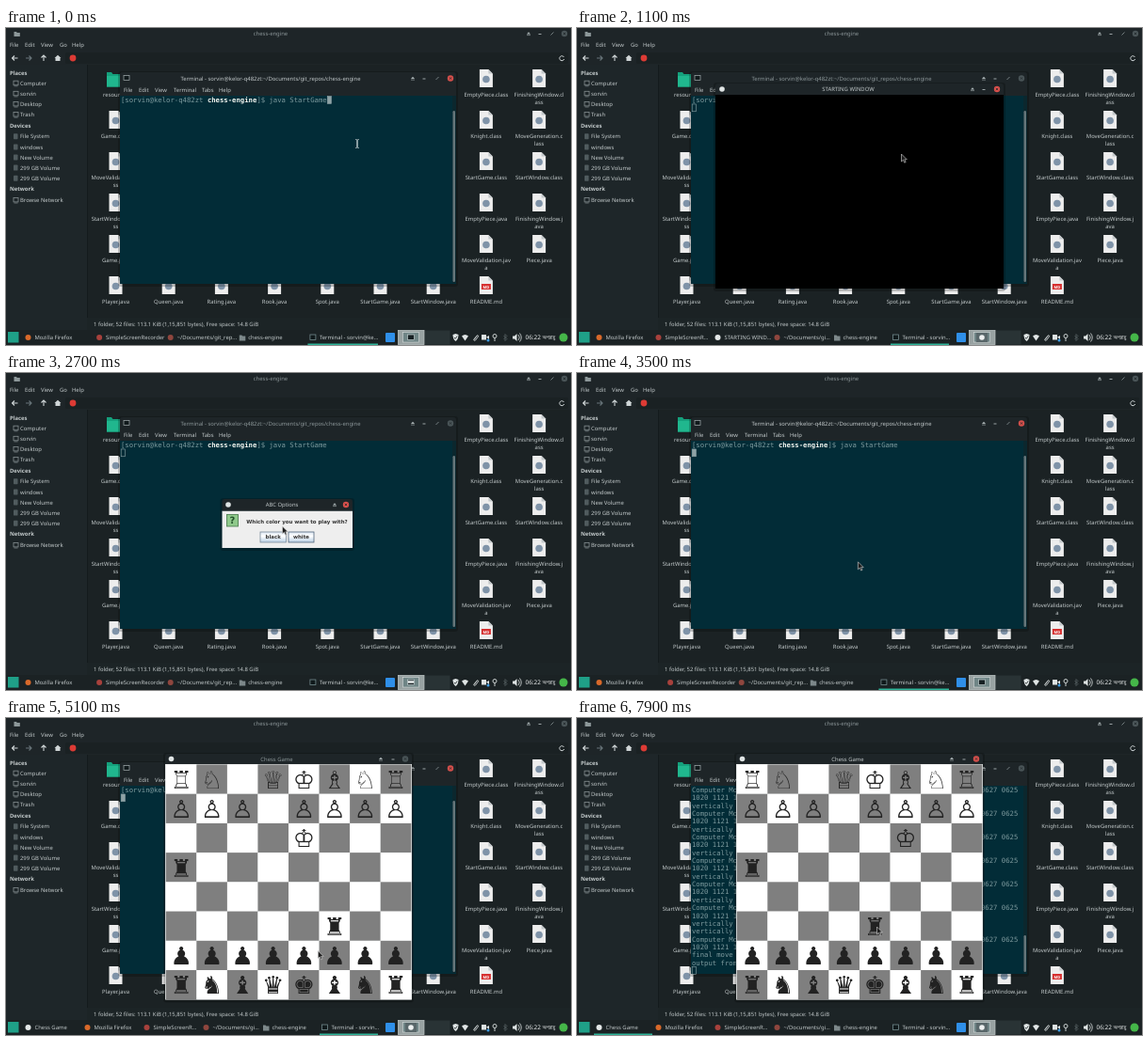
Animation, 600 px wide and 337 px high, one loop 8 s. Source, as an HTML page:

```html
<!DOCTYPE html>
<html lang="en">
<head>
<meta charset="utf-8">
<title>Chess engine demo</title>
<style>
html, body { margin: 0; width: 100%; height: 100%; overflow: hidden; background: #1b2224; }
svg { display: block; width: 100vw; height: 100vh; }
text { font-family: "Noto Sans", "Open Sans", sans-serif; font-size: 5.9px; fill: #c3cacb; white-space: pre; text-rendering: geometricPrecision; }
.b { font-weight: 700; }
.mid { text-anchor: middle; }
.dim { fill: #8d989a; }
.mono { font-family: "DejaVu Sans Mono", monospace; font-size: 7.28px; fill: #7f9a9e; }
.java { font-family: "DejaVu Sans", sans-serif; font-weight: 700; text-anchor: middle; }
.piece { font-family: "DejaVu Sans", sans-serif; font-size: 26px; fill: #222; text-anchor: middle; }
</style>
</head>
<body>
<svg id="stage" viewBox="0 0 600 337" preserveAspectRatio="none"></svg>
<script>
const LOOP = 8000;
const USER = 'sorvin', HOST = 'kelor-q482zt';
const TEAL = '#2eb398', RED = '#d8504c', HEADER = '#1e2528', GREY = '#4a5558';
const CHAR = 4.385;
const lineY = i => 78.9 + i * 8.35;

const rect = (x, y, w, h, fill, more = '') =>
  `<rect x="${x}" y="${y}" width="${w}" height="${h}" fill="${fill}" ${more}/>`;
const dot = (x, y, r, fill, more = '') => `<circle cx="${x}" cy="${y}" r="${r}" fill="${fill}" ${more}/>`;
const line = (d, color = '#aab3b5', width = 0.9) =>
  `<path d="${d}" fill="none" stroke="${color}" stroke-width="${width}"/>`;
const shape = (d, fill, more = '') => `<path d="${d}" fill="${fill}" ${more}/>`;
// y is the visual middle of the line
const label = (x, y, s, cls = '', more = '') =>
  `<text x="${x}" y="${y + 2.1}" class="${cls}" ${more}>${s}</text>`;
const group = (id, body) => `<g id="${id}">${body}</g>`;

const closeButton = (x, y, color, id = '') => dot(x, y, 3.2, color, id && `id="${id}"`) +
  line(`M${x - 1.2} ${y - 1.2}l2.4 2.4m0-2.4l-2.4 2.4`, '#20282a', 0.7);
const upButton = (x, y) => shape(`M${x - 2} ${y + 0.6}l2-2.4 2 2.4z`, '#aab3b5') + line(`M${x - 2} ${y + 1.6}h4`, '#aab3b5', 0.6);
const dashButton = (x, y) => line(`M${x - 1.5} ${y + 0.5}h3`);
const growButton = (x, y) => line(`M${x - 1.5} ${y + 1.5}l3-3`, '#8d989a', 0.8);
const appIcon = (x, y) => dot(x, y, 2.8, '#dfe4e4');

function frame(x, y, w, h, bar, body) {
  return rect(x - 2, y - 1, w + 4, h + 4, '#000', 'opacity=".22" rx="3"') + rect(x, y + bar, w, h - bar, body) +
    shape(`M${x} ${y + bar}v${3 - bar}q0-3 3-3h${w - 6}q3 0 3 3v${bar - 3}z`, HEADER);
}

const page = (x, y) => shape(`M${x - 7} ${y - 10}h9.5l4.5 4.5v14.5h-14z`, '#ededed') +
  shape(`M${x + 2.5} ${y - 10}v4.5h4.5z`, '#c3c8ca');

function fileManager() {
  const col = i => 116.5 + i * 56.2;
  const row = i => 54 + i * 44;
  const files = [
    [0, 1, 'Game.class'], [0, 2, 'MoveValidation.cla', 'ss'], [0, 3, 'StartWindow$1.cla', 'ss'],
    [0, 4, 'Game.java'], [0, 5, 'Player.java'], [1, 5, 'Queen.java'], [2, 5, 'Rating.java'],
    [3, 5, 'Rook.java'], [4, 5, 'Spot.java'], [5, 5, 'StartGame.java'], [6, 5, 'StartWindow.java'],
    [7, 0, 'EmptyPiece.class'], [7, 1, 'Knight.class'], [7, 2, 'StartGame.class'],
    [7, 3, 'EmptyPiece.java'], [7, 4, 'MoveValidation.jav', 'a'], [7, 5, 'README.md'],
    [8, 0, 'FinishingWindow.cl', 'ass'], [8, 1, 'MoveGeneration.c', 'lass'],
    [8, 2, 'StartWindow.class'], [8, 3, 'FinishingWindow.j', 'ava'], [8, 4, 'Piece.java']
  ];
  let s = rect(0, 0, 600, 337, '#1b2224') + rect(0, 0, 600, 39, HEADER) + rect(0, 39, 86, 282, '#1e2629') +
    rect(86, 39, 0.6, 282, '#12181a') + rect(63, 26, 534, 12, '#1a2123', 'rx="1.5"') + rect(86, 308, 514, 13, '#1c2426');
  s += shape('M8.5 4h2.500l.8 1h3v4h-6.300z', '#8d989a') + label(281, 6, 'chess-engine', 'mid dim') +
    upButton(555, 6) + dashButton(567, 6) + growButton(580, 6) + closeButton(593, 6, GREY);
  [[4, 'File'], [20, 'Edit'], [37, 'View'], [57, 'Go'], [70, 'Help']].forEach(([x, t]) => s += label(x, 18, t));
  s += line('M12.5 32h-6m2.5-2.5l-2.500 2.500 2.500 2.500', '#d0d6d7', 1.1) + line('M21 32h6m-2.5-2.5l2.5 2.5-2.5 2.5', '#69757a', 1.1) +
    line('M40 35v-6m-2.5 2.5l2.5-2.5 2.5 2.5', '#d0d6d7', 1.1) + shape('M51.5 32l3.5-3.2 3.5 3.2h-1v3h-5v-3z', '#d0d6d7') +
    dot(71, 32, 3.4, '#dd3b35') + line('M592.5 31a2.500 2.500 0 1 0 .2 2', '#d0d6d7', 1);

  [[47.5, 'Places'], [103.5, 'Devices'], [171, 'Network']].forEach(([y, t]) => s += label(4, y, t, 'b'));
  const places = ['Computer', USER, 'Desktop', 'Trash'];
  const drives = ['File System', 'windows', 'New Volume', '299 GB Volume', '299 GB Volume'];
  const place = (t, y) => rect(8, y - 2.6, 5, 4.5, 'none', 'stroke="#858f91" stroke-width=".8"') +
    line(`M8.5 ${y + 3}h4`, '#858f91', 0.7) + label(15, y, t);
  places.forEach((t, i) => s += place(t, 58.8 + i * 11.1));
  drives.forEach((t, i) => s += rect(8, 112.3 + i * 11.1, 4.5, 6, '#505b5e', 'rx=".7"') + label(15, 115.3 + i * 11.1, t));
  s += place('Browse Network', 183);

  s += shape('M107 47h5l1.5 2h8v13.5h-14.5z', '#15a07c') + rect(107, 51, 14.5, 11.5, '#20b78e') + label(col(0), 70.8, 'resources', 'mid');
  files.forEach(([c, r, first, rest]) => {
    const x = col(c), y = row(r);
    s += page(x, y);
    s += first === 'README.md'
      ? rect(x - 5, y - 2, 10, 6, '#d62f2f') + label(x, y + 0.5, 'MD', 'mid b', 'style="font-size:4px;fill:#fff"')
      : dot(x, y + 0.5, 3.8, '#7f93a8');
    s += label(x, y + 16.6, first, 'mid');
    if (rest) s += label(x, y + 24.6, rest, 'mid');
  });
  return s + label(93, 315, '1 folder, 52 files: 113.1 KiB (1,15,851 bytes), Free space: 14.8 GiB');
}

function terminal() {
  const mono = (i, str, x = 122) => `<text class="mono" x="${x}" y="${lineY(i)}">${str}</text>`;
  const prompt = mono(0, `[${USER}@${HOST} <tspan font-weight="700" fill="#f1f3ee">chess-engine</tspan>]$ java StartGame`);
  const kinds = ['Computer Moves', '1020 1121 1222 1323 1424 1525', 'vertically moving'];
  let log = '';
  for (let i = 0; i < 21; i++) {
    const kind = i < 18 ? i % 3 : (i - 16) % 3;
    log += mono(i, kinds[kind]);
    if (kind === 0) log += mono(i, '0627 0625', 122 + 70 * CHAR);
  }
  log += mono(21, 'final move 0422 0522') + mono(22, 'output from engine');
  const menu = [[125, 'File'], [141, 'Edit'], [158, 'View'], [178, 'Terminal'], [208, 'Tabs'], [226, 'Help']]
    .map(([x, t]) => label(x, 66, t)).join('');
  return frame(121, 47, 357, 225, 25, '#022c37') + rect(125, 50.5, 6, 5, '#10191b', 'stroke="#a5afb1" stroke-width=".7"') +
    label(281, 53.5, `Terminal - ${USER}@${HOST}:~/Documents/git_repos/chess-engine`, 'mid', 'id="termTitle"') +
    upButton(432, 53.5) + dashButton(444, 53.5) + growButton(458, 53.5) + closeButton(472, 53.5, RED, 'termClose') + menu +
    rect(474, 72, 4, 199, '#0b272e') + rect(474.5, 88, 2.5, 182, '#65767a', 'rx="1.2" id="scroll"') +
    group('prompt', prompt) + group('log', log) +
    '<rect id="caret" width="4.2" height="7.8" stroke="#8fa3a6" stroke-width=".6"/>';
}

function startWindow() {
  const big = (y, s, size, fill) => `<text class="java" x="300" y="${y}" style="font-size:${size}px;fill:${fill}">${s}</text>`;
  return frame(147, 59, 306, 218, 12, '#000') + appIcon(154, 65) + label(288, 65, 'STARTING WINDOW', 'mid') +
    upButton(420, 65) + dashButton(432, 65) + closeButton(446, 65, RED) +
    group('menuBody', big(110, 'AUTONOMUS CHESS ENGINE', 17.5, '#ffff21') +
      rect(237, 136.5, 126, 22, '#fb0b0b', 'stroke="#b9d5e6" stroke-width="1.2"') + big(153.1, 'START GAME', 15.3, '#240808') +
      rect(273.5, 181, 53, 22.5, '#0505ff', 'stroke="#8799b0" stroke-width=".8"') + big(197.8, 'EXIT', 15.3, '#08081f'));
}

function dialog() {
  const small = (x, y, s) => `<text class="java" x="${x}" y="${y}" style="font-size:5.45px;fill:#333">${s}</text>`;
  const button = (x, w, s, stroke) =>
    rect(x, 169, w, 11, 'url(#metal)', `stroke="${stroke}" stroke-width=".8"`) + small(x + w / 2, 176.2, s);
  return frame(229.5, 134, 138.5, 52, 12.5, '#eee') + appIcon(236, 140) + label(293, 140, 'ABC Options', 'mid') +
    upButton(349, 140) + closeButton(361, 140, RED) +
    rect(234.5, 150.5, 12, 12.5, '#8fc98b', 'stroke="#4f8152" stroke-width=".9"') +
    '<text class="java" x="240.5" y="160.3" style="font-size:10px;fill:#22502a">?</text>' +
    small(309, 159.5, 'Which color you want to play with?') +
    button(270, 27.5, 'black', '#7a8a99') + button(300, 27, 'white', '#50657c');
}

const CELL_W = 32.56, CELL_H = 31.22;
const cellX = c => 169.8 + (c + 0.5) * CELL_W;
const cellY = r => 49.5 + (r + 0.5) * CELL_H + 9.8;

function chessWindow() {
  const setup = ['♖♘ ♕♔♗♘♖', '♙♙♙ ♙♙♙♙', '', '♜', '', '', '♟♟♟♟♟♟♟♟', '♜♞♝♛♚♝♞♜'];
  const piece = (r, c, ch, id = '') => `<text class="piece" ${id} x="${cellX(c)}" y="${cellY(r)}">${ch}</text>`;
  let s = frame(169, 38, 262, 261.5, 11, '#dfe2e2') + appIcon(175.5, 43.5) +
    label(287.5, 43.5, 'Chess Game', 'mid', 'id="chessTitle"') + upButton(398, 43.5) + dashButton(411, 43.5) + closeButton(424, 43.5, GREY, 'chessClose');
  for (let r = 0; r < 8; r++) for (let c = 0; c < 8; c++) {
    s += rect(169.8 + c * CELL_W, 49.5 + r * CELL_H, CELL_W, CELL_H, (r + c) % 2 ? '#7f7f7f' : '#fff');
    const ch = setup[r][c];
    if (ch && ch !== ' ') s += piece(r, c, ch);
  }
  return s + piece(2, 4, '♔', 'id="king"') + piece(5, 5, '♜', 'id="rook"');
}

const TASKS = {
  fox: ['Mozilla Firefox', 'Mozilla Firefox', '#d9692a'],
  rec: ['SimpleScreenRecorder', 'SimpleScreenR...', '#a8413c'],
  edit: ['~/Documents/git_rep...', '~/Documents/gi...', '#8f463e'],
  files: ['chess-engine', 'chess-engine', '#7d888a'],
  term: [`Terminal - ${USER}@${HOST.slice(0, 2)}...`, `Terminal - ${USER}...`, '#72898c'],
  start: ['', 'STARTING WIND...', '#e4e8e8'],
  chess: ['', 'Chess Game', '#e4e8e8']
};
const BARS = {
  barIdle: ['fox', 'rec', 'edit', 'files', 'term'],
  barStart: ['fox', 'rec', 'start', 'edit', 'files', 'term'],
  barChess: ['chess', 'fox', 'rec', 'edit', 'files', 'term']
};
const pitch = keys => 378 / keys.length;

function taskbar() {
  let s = rect(0, 321, 600, 16, '#1b2224') + rect(2, 323, 11.5, 11.5, '#1fa088') +
    `<rect id="active" y="335.5" height="1.5" fill="${TEAL}"/>`;
  for (const [id, keys] of Object.entries(BARS)) {
    const w = pitch(keys);
    s += group(id, keys.map((key, i) => {
      const [long, short, color] = TASKS[key], x = 18 + i * w;
      const icon = key === 'files' ? shape(`M${x + 3} 326.5h2.5l1 1h3v5h-6.5z`, color)
        : key === 'term' ? rect(x + 2.5, 326, 6, 5.5, '#10191b', `stroke="${color}" stroke-width=".8"`)
        : dot(x + 5.5, 329, 3, color);
      return icon + label(x + 12.5, 329, keys.length === 5 ? long : short);
    }).join(''));
  }
  s += rect(403, 324, 10, 10, '#2f8fe8', 'rx="1"') + rect(444.5, 321.5, 27, 15, '#293335') +
    rect(416.5, 321.5, 27.5, 15, '#98a2a2', 'stroke="#b9c1c1" stroke-width=".8"') +
    rect(421.5, 323.5, 17, 10.5, '#6f8586', 'stroke="#d5dbdb" stroke-width=".6"') +
    group('miniTerm', rect(426.5, 326, 7, 5.5, '#162023', 'stroke="#c3d0d0" stroke-width=".7"')) +
    group('miniGame', rect(424, 324, 12, 10, '#59676a') + dot(430, 329, 2.8, '#eef1f1')) +
    group('miniDialog', rect(426.7, 327.2, 6.5, 2.5, '#e9eded'));
  s += shape('M474.5 326l3-1 3 1q0 5-3 7-3-2-3-7z', '#dfe4e4') + line('M476 329l1.2 1.3 2-2.8', '#1b2224', 0.8) +
    shape('M484 327.5q3.5-3 7 0l-3.5 5z', '#dfe4e4') +
    line('M496.500 331.500l3.500-4.500q1.500-1 1.500 1l-3 4q-1.500 1-1.500-.5l2.500-3', '#dfe4e4', 0.8) +
    rect(505, 326, 5, 5.5, '#dfe4e4') + shape('M510 328.5l3-1.500v4z', '#dfe4e4') + dot(512, 332, 1.5, '#3f9de4') +
    dot(519, 327.5, 2, 'none', 'stroke="#dfe4e4" stroke-width=".9"') + line('M519 329.500v3.500', '#dfe4e4') +
    line('M528.500 327l3.500 3.500-2 2v-7l2 2-3.500 3.500', '#566164', 0.8) +
    shape('M538 327.5h2l2.5-2.5v8l-2.5-2.5h-2z', '#dfe4e4') + line('M544 326q2.5 3 0 6m1.5-7.5q3.5 4.5 0 9', '#dfe4e4', 0.8) +
    label(551.5, 329, '06:22 অপরাহ্ণ', '', 'style="font-size:6.4px;font-weight:500;fill:#eef1f1"') + dot(592, 329, 4.5, '#45b649');
  return s;
}

const pointers = group('ibeam', line('M-1.8-4.5q1.8 0 1.8 1v7q0 1-1.8 1m3.6-9q-1.8 0-1.8 1v7q0 1 1.8 1', '#d9dfdf', 0.8)) +
  group('arrow', shape('M-1.5-4v8l1.9-1.7 1.3 2.9 1.4-.6-1.3-2.8h2.5z', '#1c1c1c', 'stroke="#d8d8d8" stroke-width=".6"')) +
  group('hand', shape('M-1.5-4.5q1.3-.8 1.3.5v3l4 .8q.8.3.6 1.5l-.8 3h-4.2l-2.4-3.5q0-1.2 1.5-.3z', '#e8e8e8', 'stroke="#222" stroke-width=".7"'));

const $ = id => document.getElementById(id);
$('stage').innerHTML = '<defs><linearGradient id="metal" x2="0" y2="1"><stop stop-color="#dde8f3"/><stop offset=".4" stop-color="#fff"/><stop offset="1" stop-color="#b8cfe5"/></linearGradient></defs>' +
  fileManager() + terminal() + group('startWin', startWindow()) + group('dialog', dialog()) +
  group('chessWin', chessWindow()) + taskbar() + group('pointer', pointers);

const AT = { enter: 300, start: 1000, painted: 1300, clicked: 2400, dialog: 2600, chosen: 3200, chess: 3700, focus: 6800, rook: 7400, reply: 7700 };
const PATH = [
  [0, 373, 123], [500, 373, 123], [1100, 346, 138], [2000, 297, 151], [2400, 297, 151], [2700, 295, 167],
  [3000, 285, 175], [3300, 285, 175], [3800, 327, 259], [4600, 327, 259], [6500, 361, 216],
  [6800, 350, 222], [7000, 350, 222], [7350, 320, 226], [8000, 320, 226]
];

function pointerAt(t) {
  const i = PATH.findIndex(p => p[0] > t), [t0, x0, y0] = PATH[i - 1], [t1, x1, y1] = PATH[i];
  const k = (t - t0) / (t1 - t0), e = k * k * (3 - 2 * k);
  return [x0 + (x1 - x0) * e, y0 + (y1 - y0) * e];
}

const show = (id, on) => $(id).setAttribute('display', on ? 'inline' : 'none');
const set = (id, attrs) => { for (const k in attrs) $(id).setAttribute(k, attrs[k]); };

function render(t) {
  const within = (a, b = LOOP) => t >= a && t < b;
  const starting = within(AT.start, AT.clicked), asking = within(AT.dialog, AT.chosen);
  const playing = within(AT.chess), focused = within(AT.focus), replied = within(AT.reply);
  const termActive = !starting && !asking && !focused;

  show('startWin', starting);
  show('menuBody', t >= AT.painted);
  show('dialog', asking);
  show('chessWin', playing);
  show('prompt', !replied);
  show('log', replied);
  set('scroll', replied ? { y: 231, height: 39 } : { y: 88, height: 182 });
  set('termTitle', { class: termActive && !playing ? 'mid' : 'mid dim' });
  set('termClose', { fill: termActive ? RED : GREY });
  set('chessTitle', { class: focused ? 'mid' : 'mid dim' });
  set('chessClose', { fill: focused ? RED : GREY });

  const row = replied ? 23 : t < AT.enter ? 0 : 1;
  set('caret', { x: row === 0 ? 122 + 50 * CHAR : 122.2, y: lineY(row) - 6.3, fill: termActive ? '#8fa3a6' : 'none' });

  set('rook', { x: cellX(t >= AT.rook ? 4 : 5) });
  set('king', { x: cellX(replied ? 5 : 4) });

  const bar = starting ? 'barStart' : playing ? 'barChess' : 'barIdle';
  for (const id in BARS) show(id, id === bar);
  const key = focused ? 'chess' : starting && t >= AT.painted ? 'start' : 'term';
  const w = pitch(BARS[bar]);
  set('active', { x: 18 + BARS[bar].indexOf(key) * w, width: w - 1 });
  show('active', !asking);
  show('miniTerm', !starting && !playing);
  show('miniGame', starting || playing);
  show('miniDialog', asking);

  const [px, py] = pointerAt(t);
  set('pointer', { transform: `translate(${px.toFixed(2)} ${py.toFixed(2)})` });
  const overButton = within(2000, AT.clicked), overText = t < AT.start;
  show('hand', overButton);
  show('ibeam', overText);
  show('arrow', !overButton && !overText);
}

function tick() {
  render(performance.now() % LOOP);
  requestAnimationFrame(tick);
}
tick();
</script>
</body>
</html>
```
